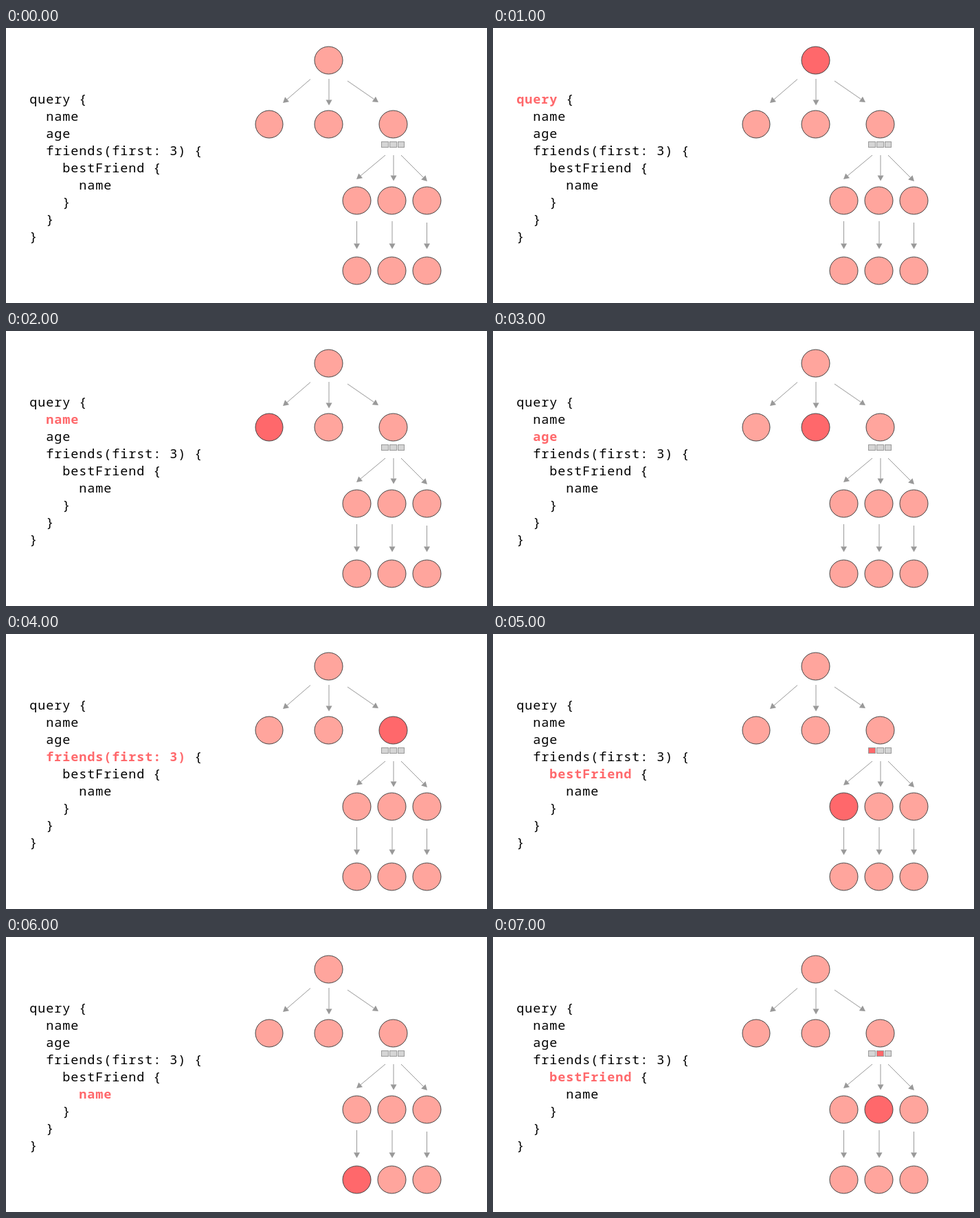
Animation of 700 by 400 pixels, one loop 8000 ms. Source, as an HTML page:

```html
<!DOCTYPE html>
<html lang="en">
<head>
<meta charset="utf-8">
<title>Query walk</title>
<style>
  html, body { margin: 0; width: 100%; height: 100%; overflow: hidden; background: #fff; }
  svg { display: block; }
  text {
    font: 18.5px "Noto Sans Mono", monospace;
    letter-spacing: 0.9px;
    font-variant-ligatures: none;
    fill: #000;
  }
  .node { fill: #ffa59d; stroke: #444; }
  .cell { fill: #d5d5d5; stroke: #999; }
  .arrow { stroke: #999; fill: none; }
  .head { fill: #999; }
  .node.on, .cell.on { fill: #ff686b; }
  text.on { fill: #ff686b; font-weight: 700; }
</style>
</head>
<body>
<svg id="stage" width="700" height="400" viewBox="0 0 700 400"></svg>
<script>
const STEP = 1000;
const ADVANCE = 12;
const stage = document.getElementById('stage');
const parts = {};

function add(tag, attrs, id) {
  const el = document.createElementNS('http://www.w3.org/2000/svg', tag);
  for (const key in attrs) el.setAttribute(key, attrs[key]);
  stage.append(el);
  if (id) parts[id] = el;
  return el;
}

// [column, row, text, id]
const words = [
  [0, 0, 'query', 'query'], [6, 0, '{'],
  [2, 1, 'name', 'name'],
  [2, 2, 'age', 'age'],
  [2, 3, 'friends(first: 3)', 'friends'], [20, 3, '{'],
  [4, 4, 'bestFriend', 'best'], [15, 4, '{'],
  [6, 5, 'name', 'bestName'],
  [4, 6, '}'], [2, 7, '}'], [0, 8, '}']
];
for (const [col, row, text, id] of words) {
  add('text', { x: 34.3 + col * ADVANCE, y: 110 + row * 25 }, id).textContent = text;
}

function arrow(x1, y1, x2, y2) {
  const len = Math.hypot(x2 - x1, y2 - y1);
  const ux = (x2 - x1) / len, uy = (y2 - y1) / len;
  const bx = x2 - ux * 8, by = y2 - uy * 8;
  add('path', { class: 'arrow', d: `M${x1} ${y1}L${bx} ${by}` });
  add('path', {
    class: 'head',
    d: `M${x2} ${y2}L${bx - uy * 4.5} ${by + ux * 4.5}L${bx + uy * 4.5} ${by - ux * 4.5}Z`
  });
}
arrow(443, 74.5, 403, 109);
arrow(470, 74, 470, 112.5);
arrow(497, 77, 542, 108);
arrow(552, 185, 510, 220);
arrow(564, 185, 564, 222.5);
arrow(575, 185, 613, 223);
arrow(510.5, 281, 510.5, 321.5);
arrow(562, 281, 562, 321.5);
arrow(612.5, 283, 612.5, 321.5);

const node = (id, cx, cy, rx = 20.5) => add('ellipse', { class: 'node', cx, cy, rx, ry: 20 }, id);
node('root', 469.5, 47);
node('nameNode', 383, 140, 20);
node('ageNode', 469.5, 140);
node('friendsNode', 563.5, 140);
for (let i = 0; i < 3; i++) {
  node('best' + i, 510.5 + i * 51, 251);
  node('leaf' + i, 510.5 + i * 51, 353);
  add('rect', { class: 'cell', x: 546.5 + i * 12, y: 165.5, width: i < 2 ? 10 : 9, height: 8 }, 'cell' + i);
}

// Parts lit during each step
const steps = [
  [],
  ['query', 'root'],
  ['name', 'nameNode'],
  ['age', 'ageNode'],
  ['friends', 'friendsNode'],
  ['best', 'best0', 'cell0'],
  ['bestName', 'leaf0'],
  ['best', 'best1', 'cell1']
];

function draw() {
  const lit = steps[Math.floor(performance.now() / STEP) % steps.length];
  for (const id in parts) parts[id].classList.toggle('on', lit.includes(id));
  requestAnimationFrame(draw);
}
draw();
</script>
</body>
</html>
```
